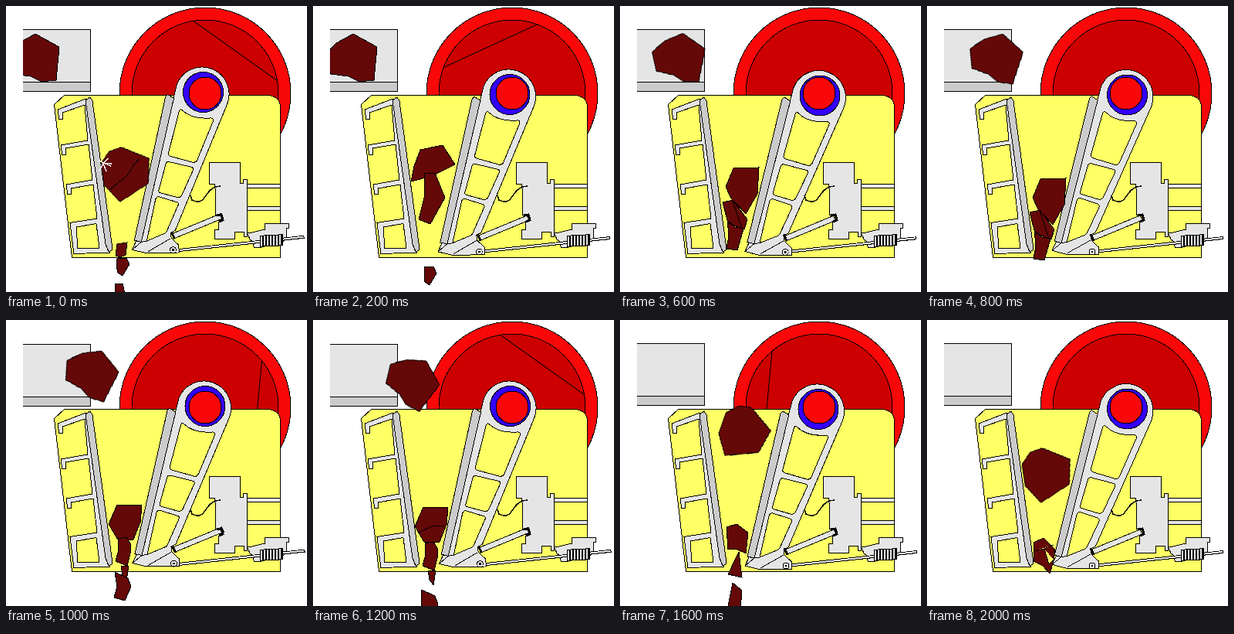
An HTML page without scripts for the animation above (2200 ms loop, 390 by 370 pixels).

```html
<!DOCTYPE html>
<html lang="en">
<head>
<meta charset="utf-8">
<title>Jaw crusher</title>
<style>
  html, body { margin: 0; width: 100%; height: 100%; overflow: hidden; background: #fff; }
  svg { display: block; width: 390px; height: 370px; shape-rendering: crispEdges; }
  svg * { vector-effect: non-scaling-stroke; }
  .ink { stroke: #000; stroke-width: 1; }
  .none { fill: none; }
  .steel { fill: #e5e5e5; }
  .plate { fill: #cbcbcb; }
  .red { fill: #f80808; }
  .rock { fill: #650808; }

  /* eleven held poses of 200 ms each */
  .spin, .jaw, .feeder, .big, .drop, .pose { animation: 2.2s step-end infinite; }

  .spin { transform-origin: 258px 113px; animation-name: spin; animation-timing-function: steps(11); }
  @keyframes spin { to { transform: rotate(-660deg); } }

  /* x, y, r: eccentric offset and arm tilt; u, v: offset of the arm's foot */
  .jaw { --x: 0px; --y: 0px; --r: 0deg; --u: 0px; --v: 0px; animation-name: jaw; }
  @keyframes jaw {
    0%, 54.5454% { --x: -1.5px; --y: -4px; --r: -.85deg; --u: 1.5px; --v: -2.5px; }
    9.0909%, 63.6363% { --x: -2px; --y: -1px; --r: -.56deg; --u: .3px; --v: 0px; }
    18.1818%, 72.7272% { --x: 0px; --y: 0px; --r: 0deg; --u: 0px; --v: 0px; }
    27.2727%, 81.8181% { --x: 2px; --y: .5px; --r: .62deg; --u: -.8px; --v: .5px; }
    36.3636%, 90.909% { --x: 2.5px; --y: -.5px; --r: .7deg; --u: -1px; --v: 0px; }
    45.4545% { --x: 1px; --y: -4px; --r: -.3deg; --u: 2.5px; --v: -3px; }
  }
  .crank { transform: translate(var(--x), var(--y)); }
  .arm { transform-origin: 257px 115px; transform: translate(var(--x), var(--y)) rotate(var(--r)); }
  .foot { transform: translate(var(--u), var(--v)); }
  .rod { transform: translate(var(--u), calc(var(--v) / 2)); }

  .feeder { animation-name: feeder; }
  @keyframes feeder {
    45.4545% { transform: translateY(1px); }
    72.7272% { transform: none; }
  }

  /* the boulder rides the feeder, then tips over its edge */
  .big { animation-name: ride; }
  @keyframes ride {
    0% { transform: translate(36px, 68px); }
    9.0909% { transform: translate(50px, 68px); }
    18.1818% { transform: translate(63px, 68px); }
    27.2727% { transform: translate(76px, 67px) rotate(6deg); }
    36.3636% { transform: translate(89px, 67px) rotate(13deg); }
    45.4545% { transform: translate(110px, 69px) rotate(22deg); }
    54.5454% { transform: translate(128px, 79px) rotate(32deg); }
    63.6363%, 100% { transform: translate(-99px, 0); }
  }

  /* and tumbles into the mouth */
  .drop { animation-name: drop; }
  @keyframes drop {
    0% { transform: translate(154px, 218px) rotate(10deg); }
    9.0909% { transform: translate(-99px, 0); }
    63.6363% { transform: translate(145px, 96px); }
    72.7272% { transform: translate(158px, 147px) rotate(38deg); }
    81.8181% { transform: translate(156px, 176px) rotate(24deg); }
    90.909% { transform: translate(154px, 201px) rotate(10deg); }
  }

  .pose { visibility: hidden; animation-name: show; animation-delay: calc(var(--k) * 200ms - 2200ms); }
  @keyframes show {
    0% { visibility: visible; }
    9.0909%, 100% { visibility: hidden; }
  }
</style>
</head>
<body>
<svg viewBox="0 0 390 370" xmlns="http://www.w3.org/2000/svg">
  <defs>
    <clipPath id="stage"><path d="M22 0H390V370H22Z"/></clipPath>
  </defs>

  <!-- flywheel -->
  <g class="ink">
    <circle class="red" cx="258" cy="113" r="111"/>
    <circle cx="258" cy="113" r="95" fill="#cc0000"/>
    <g class="spin"><path d="M325.7 46.4V179.6" transform="rotate(-54.6 258 113)"/></g>
  </g>

  <!-- housing -->
  <path class="ink" fill="#ffff66" d="M75.5 115.5H338Q355.500 116 355.500 132V325.500H85.500L62.500 127.500Z"/>

  <!-- feeder table -->
  <g class="feeder">
    <path class="steel" d="M22 30.500H109.500V98.500H22Z"/>
    <path class="plate" d="M22 98.500H109.500V110.500H22Z"/>
    <path class="ink none" d="M22 30.500H109.500V110.500H22M22 98.500H109.500"/>
  </g>

  <!-- fixed jaw -->
  <g class="ink">
    <path class="steel" fill-rule="evenodd" d="M67 134L101 121L105 120L135 319L88 320.500L83 280.500L118 275
      L113 231L84 236L85 243L80 244L78 231L112 225L107 179L77 184L78 192L73 193L71 180L106 174L102 128L73 138L74 146L69 147Z
      M91 286L117 281.500L121 313L93 314Z"/>
    <path class="plate" d="M103 122L109 118L112 123L137 307V316L133 318L129 308Z"/>
  </g>

  <!-- rear block and tension bracket -->
  <g class="ink steel">
    <path d="M312 230.500H355.500V235.500H312ZM312 259.500H355.500V264.500H312Z"/>
    <path d="M263.500 202.500H303.500V229.500H307.500V224.500H312.500V298.500H308.500V292.500H296.500V301.500H270.500V289.500H275.500V280L281 277L279 269L271 271V236L270.500 230.500H263.500Z"/>
    <path d="M312.500 293.500H317L335.500 289V281.500H366.500V287.500H363.500V300L358 306H340L330 312.500H321.500L319 304L316 302Z"/>
  </g>

  <g class="jaw">
    <!-- tension rod and spring -->
    <g class="rod">
      <path d="M216 318L385 300" stroke="#000" stroke-width="4"/>
      <path d="M216 318L384 300" stroke="#e5e5e5" stroke-width="2"/>
    </g>
    <g fill="none" transform="rotate(-3 344 303)">
      <path d="M329 303.500H359" stroke="#000" stroke-width="15"/>
      <path d="M330 303.500H358" stroke="#e5e5e5" stroke-width="13" stroke-dasharray="2 2"/>
    </g>

    <!-- moving jaw -->
    <g class="arm ink">
      <path class="steel" fill-rule="evenodd" d="M217 128L223 105A35 35 0 1 1 288 131L218 294L212 297L213 304L222.500 313V322.500H180L162 318L168 305Z
        M229 138Q242 151 267 149Q271 150 269 154L248 203Q246 207 242 206L214 198Q210 197 211 193L225 141Q226 136 229 138Z
        M212 205L240 212Q244 213 242 217L228 247Q226 252 221 251L200 245Q196 244 198 240L207 208Q208 204 212 205Z
        M198 250L220 257Q224 258 222 262L207 295Q206 297 203 298L181 307L193 254Q194 249 198 250Z"/>
      <path class="plate" d="M211 118L219 123L217 130L174 308L165 306L208 121Z"/>
      <path class="none" d="M181 307L174 308L162 318M182 321L212 304"/>
    </g>
    <circle class="foot ink steel" cx="215" cy="318" r="4"/>
    <circle class="foot ink" cx="215" cy="318" r="1"/>

    <!-- toggle -->
    <g class="foot">
      <path class="ink steel" d="M214 297L277 271L280 277L217 303Z"/>
      <path d="M213 295L217 304" stroke="#000" stroke-width="3"/>
    </g>
    <path class="none" d="M273 271L279 270L281 277L276 279" stroke="#000" stroke-width="3"/>
    <path class="ink none" d="M239 245L241 251C261 261 255 234 278 233" style="stroke-width:1.500"/>

    <circle class="crank ink" cx="257" cy="115.500" r="26" fill="#3300ff"/>
    <circle class="ink red" cx="258" cy="113" r="21"/>
  </g>

  <g class="ink rock" clip-path="url(#stage)">
    <g class="big"><path d="M2-32L33-15L29 28L10 30L-4 23L-27 20L-35-4L-20-20Z"/></g>
    <g class="drop"><path d="M-11-34L27-26L32 6L0 36L-24 18L-33-9L-25-26Z"/></g>

    <!-- fragments working their way down -->
    <g class="pose" style="--k:0">
      <path class="none" d="M134 238L150 225Q159 219 163 209L173 197"/>
      <path d="M144 308L157 306L155 322L148 325L142 323ZM144 327L156 326L160 334L151 349L145 345L143 336ZM141 359H151L154 372H141Z"/>
      <path d="M120 200L136 207M125 203L137 204M126 204L132 197M126 204L121 213M126 204L130 214" stroke="#fff" stroke-width="1.500"/>
    </g>
    <g class="pose" style="--k:1">
      <use href="#cap" y="-10"/>
      <use href="#shard" y="-20"/>
      <path d="M144 338L156 337L160 346L151 361L145 357Z"/>
    </g>
    <g class="pose" style="--k:2">
      <path id="cap" d="M139 196L168 190L184 215L154 230L127 237L131 217Z"/>
      <path id="shard" d="M144 237L158 236L171 268L152 302L137 296L144 268Z"/>
    </g>
    <g class="pose" style="--k:3">
      <use href="#wedge" y="-14"/>
      <use href="#split" y="-13"/>
    </g>
    <g class="pose" style="--k:4">
      <path id="wedge" d="M147 224L180 223L178 257L163 283L144 263L137 248Z"/>
      <path id="split" d="M133 267L146 264L165 289L161 302L140 294ZM139 290L149 299L160 301L152 329L138 327L141 310ZM146 265L158 301"/>
    </g>
    <g class="pose" style="--k:5">
      <path id="top" d="M144 239L176 240L174 262L165 284L145 284L133 264Z"/>
      <path id="mid" d="M145 283L156 281L161 289L162 298L157 318L142 312L146 297ZM149 318H159L156 337L151 330Z"/>
      <path d="M141 326L158 334L162 345L154 363L140 359L144 345Z"/>
    </g>
    <g class="pose" style="--k:6">
      <use href="#top" x="-1" y="3"/>
      <path class="none" d="M137 275L154 267L170 266"/>
      <use href="#mid" y="6"/>
      <path d="M141 349L158 357L162 368L159 374H140Z"/>
    </g>
    <g class="pose" style="--k:7">
      <path d="M147 245L162 244L170 263L158 272L143 278L141 262ZM137 276L167 265L159 280L145 294L136 287Z"/>
      <path d="M143 292L152 290L159 300L155 328L141 323L144 307ZM144 346L157 347L161 362L155 375L141 370Z"/>
    </g>
    <g class="pose" style="--k:8">
      <path id="nub" d="M138 268L151 264L166 275L163 302L150 296L140 297Z"/>
      <path id="chip" d="M154 300L158 333L140 329Z"/>
      <path d="M146 340L158 350L156 375H139Z"/>
    </g>
    <g class="pose" style="--k:9">
      <use href="#nub" y="10"/>
      <use href="#chip" y="15"/>
    </g>
    <g class="pose" style="--k:10">
      <path d="M138 288L151 282L166 297L164 312L159 328L150 318L138 312ZM138 299L152 296L164 291M152 296L158 316L164 310"/>
    </g>
  </g>
</svg>
</body>
</html>
```
